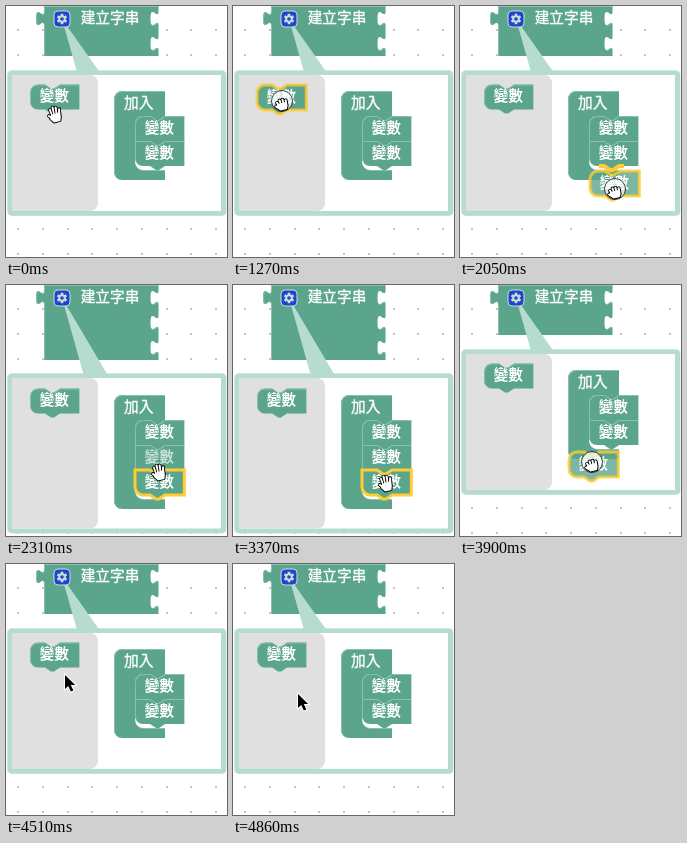
An HTML page with a canvas that plays this animation: 221 by 251 pixels, repeating every 5360 ms.

```html
<!DOCTYPE html>
<html lang="zh-Hant">
<head>
<meta charset="utf-8">
<title>建立字串</title>
<style>
html, body { margin: 0; width: 100%; height: 100%; overflow: hidden; background: #fff; }
canvas { display: block; width: 221px; height: 251px; }
</style>
</head>
<body>
<canvas id="stage"></canvas>
<script>
const W = 221, H = 251, LOOP = 5360, STEP = 260 / 3;
const GREEN = '#5ba58c', LIGHT = '#8cc0ae', YELLOW = '#fc3', MINT = '#b5dccf';
const FAMILY = '14.67px "Noto Sans CJK TC", "Noto Sans CJK", "Noto Sans", sans-serif';
const NOTCH = 'l6,4 3,0 6,-4', NOTCH_BACK = 'l-6,4 -3,0 -6,-4';
const ITEM_W = 49.3;

const canvas = document.getElementById('stage');
const dpr = window.devicePixelRatio || 1;
canvas.width = W * dpr;
canvas.height = H * dpr;
const c = canvas.getContext('2d');

const mix = (a, b, p) => a.map((v, i) => v + (b[i] - v) * p);
const ease = p => p * p * (3 - 2 * p);
const stepAt = (t, start) => Math.floor((t - start + 4) / STEP);

// Walks a list of [step, x, y] points.
function along(keys, k) {
  let i = 0;
  while (i < keys.length - 2 && k > keys[i + 1][0]) i++;
  const [a, b] = [keys[i], keys[i + 1]];
  const p = Math.max(0, Math.min(1, (k - a[0]) / (b[0] - a[0])));
  return mix(a.slice(1), b.slice(1), p).map(Math.round);
}

// ---- blocks ----
function itemPath(squareTop, squareBottom) {
  return new Path2D(
    (squareTop ? 'M0,0' : 'M0,8 A8,8 0 0 1 8,0') + `H15 ${NOTCH} H${ITEM_W} V25 H30 ${NOTCH_BACK}` +
    (squareBottom ? 'H0 z' : 'H8 a8,8 0 0 1 -8,-8 z'));
}

function containerPath(count) {
  const h = count * 25 + 4;
  return new Path2D(`M0,8 A8,8 0 0 1 8,0 H51 V25 ${NOTCH_BACK} h-7 a8,8 0 0 0 -8,8 v${h - 16}` +
    `a8,8 0 0 0 8,8 H51 v10 H8 a8,8 0 0 1 -8,-8 z`);
}

function joinPath(rows) {
  let d = 'M0,0 H114.5';
  for (let i = 0; i < rows; i++) d += ' v5 c0,10 -8,-8 -8,7.5 s8,-2.5 8,7.5 v5';
  return new Path2D(d + ' H0 V20 c0,-10 -8,8 -8,-7.5 s8,2.5 8,-7.5 z');
}

function label(text, x, y, weight = 500, alpha = 1) {
  c.globalAlpha = alpha;
  c.fillStyle = c.strokeStyle = '#fff';
  c.font = `${weight} ${FAMILY}`;
  c.fillText(text, x, y);
  if (weight < 700) {
    c.lineWidth = 0.35;
    c.strokeText(text, x, y);
  }
  c.globalAlpha = 1;
}

function block(path, x, y, { selected, dragging } = {}) {
  c.save();
  c.translate(x, y);
  c.globalAlpha = dragging ? 0.8 : 1;
  c.fillStyle = GREEN;
  c.fill(path);
  if (selected) {
    c.strokeStyle = YELLOW;
    c.lineWidth = 3;
    c.stroke(path);
  } else {
    c.clip(path);
    c.translate(0.5, 0.5);
    c.strokeStyle = LIGHT;
    c.lineWidth = 1;
    c.stroke(path);
  }
  c.restore();
}

function item(x, y, o = {}) {
  block(itemPath(o.squareTop, o.squareBottom), x, y, o);
  label('變數', x + 9.7, y + 16.7, 700, o.textAlpha);
}

function container(y, count, selected, faded) {
  block(containerPath(count), 108, y);
  label('加入', 118, y + 16.7);
  for (let i = 0; i < count; i++) {
    item(129, y + 25 * (i + 1), {
      squareTop: i > 0, squareBottom: i < count - 1,
      selected: i === selected, textAlpha: i === faded ? 0.65 : 1
    });
  }
}

// ---- workspace ----
function grid() {
  c.fillStyle = '#c4c4c4';
  for (let y = 24; y < H; y += 24.9)
    for (let x = 12; x < W; x += 24.75) c.fillRect(Math.round(x) - 1, Math.round(y) - 1, 2, 2);
}

function rounded(x, y, w, h, r, fill) {
  c.beginPath();
  c.roundRect(x, y, w, h, r);
  c.fillStyle = fill;
  c.fill();
}

function bubble(top, bottom) {
  const grow = top - 64;
  rounded(1, top, 219.5, bottom - top, 5, '#cfe8df');
  rounded(2, top + 1, 218, bottom - top - 1.5, 4, MINT);
  c.fillStyle = MINT;
  c.beginPath();
  c.moveTo(56, 13);
  c.lineTo(71 + grow * 0.28, top + 2);
  c.lineTo(93.5 + grow * 0.34, top + 2);
  c.fill();
  c.fillStyle = '#fff';
  c.fillRect(6, top + 5, 209, bottom - top - 10);
  rounded(6, top + 5, 86, bottom - top - 10, [0, 8, 8, 0], '#e0e0e0');
}

function gearIcon() {
  c.save();
  c.translate(56, 13);
  rounded(-8, -8, 16, 16, 4, '#2442d1');
  c.strokeStyle = c.fillStyle = '#c4e0d8';
  c.lineWidth = 1;
  c.stroke();
  c.beginPath();
  c.arc(0, 0, 3.8, 0, 7);
  c.fill();
  for (let i = 0; i < 6; i++) {
    c.rotate(Math.PI / 3);
    c.fillRect(-1.3, -5.2, 2.6, 3);
  }
  c.beginPath();
  c.arc(0, 0, 1.8, 0, 7);
  c.fillStyle = '#2442d1';
  c.fill();
  c.restore();
}

function scene(big, o) {
  const shift = big ? 25 : 0;
  c.fillStyle = '#fff';
  c.fillRect(0, 0, W, H);
  grid();
  block(joinPath(big ? 3 : 2), 38, 0);
  label('建立字串', 74.7, 17.2);
  bubble(big ? 88 : 64, big ? 248.5 : 210);
  gearIcon();
  item(24, 78.5 + shift, { selected: o.hover });
  container(85 + shift, o.count, o.selected, o.faded);
}

function snapHint(y) {
  c.strokeStyle = YELLOW;
  c.lineWidth = 4;
  c.stroke(new Path2D(`M139,${y} h5 ${NOTCH} h5`));
}

// ---- pointers ----
function line(points, width, color) {
  c.beginPath();
  points.forEach(p => c.lineTo(...p));
  c.lineWidth = width;
  c.strokeStyle = color;
  c.stroke();
}

function hand(x, y, closed) {
  const tips = closed
    ? [[-4.5, -2.5], [-1.5, -4], [1.5, -4], [4.5, -2.7]]
    : [[-3.8, -5.2], [-0.8, -6.8], [2.2, -6], [5.2, -3.6]];
  const palm = new Path2D(closed
    ? 'M-5,-1 L5.3,-1 5,3 3.5,6 H-3 L-5.5,3 z'
    : 'M-4,0 L5.5,-1 5,4 3.5,8 H-3 L-6,3.5 z');
  c.save();
  c.translate(x, y);
  c.rotate(-0.25);
  c.lineCap = c.lineJoin = 'round';
  c.strokeStyle = '#000';
  c.lineWidth = 2;
  c.stroke(palm);
  const fingers = [...tips.map((p, i) => [p, [-3 + i * 2.3, 1]]), [[-6.3, closed ? 1 : 0.5], [-3, 4]]];
  for (const f of fingers) {
    line(f, 3.8, '#000');
    line(f, 2.1, '#fff');
  }
  c.fillStyle = '#fff';
  c.fill(palm);
  c.restore();
}

function press(x, y, remove) {
  c.beginPath();
  c.arc(x, y, 10.5, 0, 7);
  c.fillStyle = 'rgba(255,255,255,.7)';
  c.fill();
  c.strokeStyle = 'rgba(20,20,20,.8)';
  c.lineWidth = 1;
  c.stroke();
  hand(x, y + 3, true);
  if (remove) {
    line([[x + 1, y + 8], [x + 7, y + 14]], 2, '#e8252b');
    line([[x + 7, y + 8], [x + 1, y + 14]], 2, '#e8252b');
  }
}

function arrow(x, y) {
  const p = new Path2D(`M${x},${y} v14 l3.2,-3 2.6,5.6 2.6,-1.2 -2.6,-5.4 h4.4 z`);
  c.strokeStyle = '#fff';
  c.lineWidth = 2;
  c.stroke(p);
  c.fillStyle = '#000';
  c.fill(p);
}

// ---- timeline ----
const DRAG_IN = [[0, 24, 79], [1, 31, 88], [3, 62, 125], [5, 93, 150], [6, 101, 156], [9, 130, 165]];
const DRAG_OUT = [[0, 129, 185], [1, 124, 179], [5, 63, 131], [6, 54, 119], [8, 38, 100]];
const HAND_OUT = [[0, 152, 198], [1, 147, 191], [5, 85, 135], [6, 75, 125], [8, 59, 110]];

function draw(t) {
  if (t < 1270) {
    scene(false, { count: 2, hover: t >= 290 });
    hand(49, t < 200 ? 108 : t < 290 ? 103 : t < 460 ? 100 : 99);
  } else if (t < 2220) {
    const k = Math.min(9, stepAt(t, 1270));
    const [x, y] = along(DRAG_IN, k);
    scene(false, { count: 2 });
    if (k >= 8) snapHint(160);
    item(x, y, { selected: true, dragging: true });
    press(x + 25, y + (k < 7 ? 16 : 18));
  } else if (t < 2310) {
    scene(false, { count: 3, selected: 2 });
    hand(154, 184);
  } else if (t < 3730) {
    scene(true, { count: 3, selected: 2, faded: t < 2400 ? 1 : -1 });
    const p = t < 2850 ? 0 : Math.min(1, (stepAt(t, 2850) + 1) / 5);
    hand(153, t < 3370 ? Math.round(187 + 10 * ease(p)) : 198);
  } else if (t < 4510) {
    const k = stepAt(t, 3730);
    if (k === 0) {
      scene(true, { count: 3, selected: 2 });
      press(152, 198);
      return;
    }
    scene(false, { count: 2 });
    const [x, y] = along(DRAG_OUT, k);
    const [hx, hy] = along(HAND_OUT, k);
    item(x, y, { selected: true, dragging: true });
    press(hx, hy, hx < 92);
  } else {
    scene(false, { count: 2 });
    const p = Math.min(1, stepAt(t, 4510) / 4);
    arrow(...mix([59, 111], [65, 130], ease(p)));
  }
}

function frame(now) {
  c.setTransform(dpr, 0, 0, dpr, 0, 0);
  draw(now % LOOP);
  requestAnimationFrame(frame);
}
requestAnimationFrame(frame);
</script>
</body>
</html>
```
